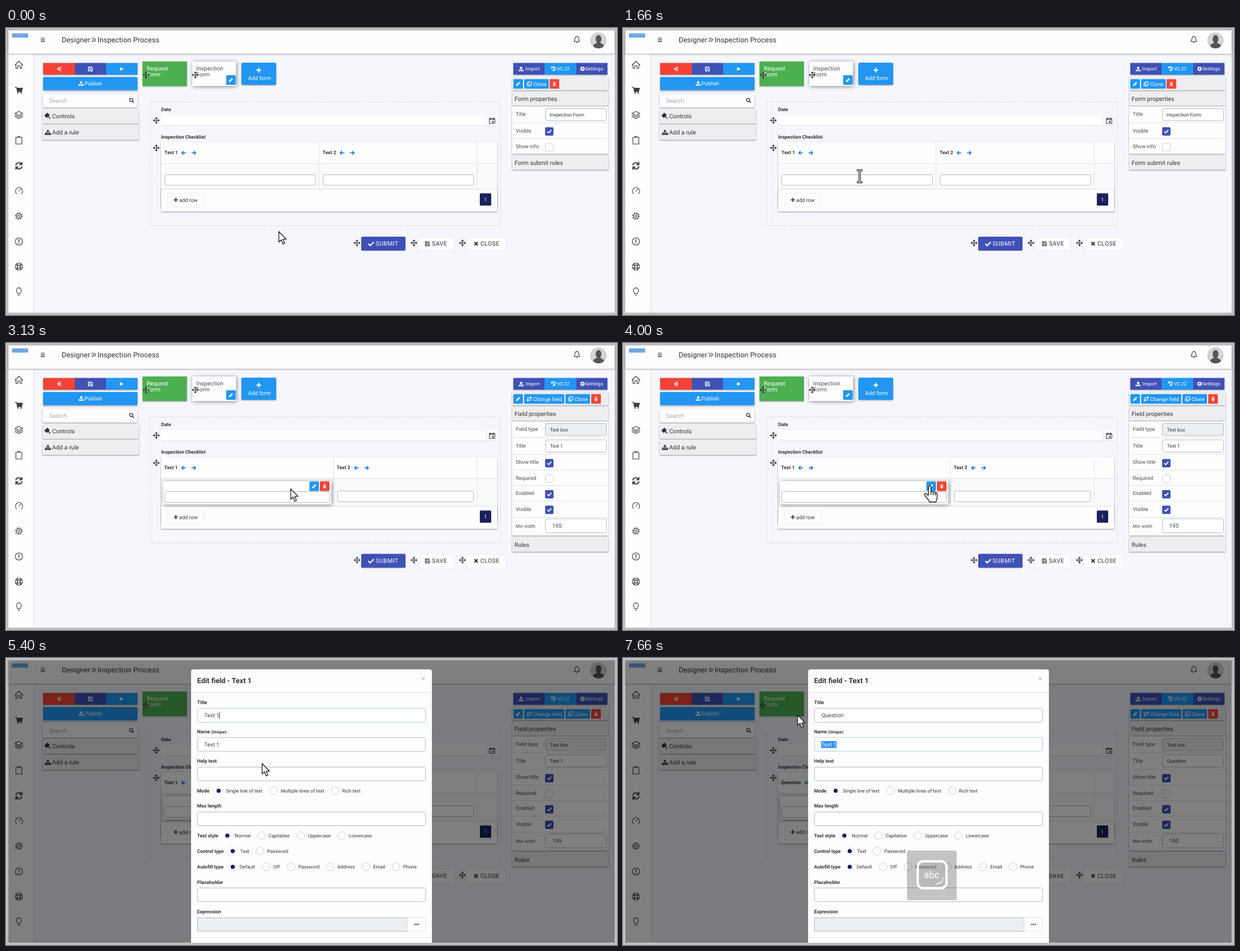
Recreate the animation shown at these times as an HTML page. Size 1020 by 480 pixels, loop 8 s.

```html
<!DOCTYPE html>
<html lang="en">
<head>
<meta charset="utf-8">
<title>Form designer</title>
<style>
html, body { margin: 0; width: 100%; height: 100%; overflow: hidden; background: #bfbfbf; }
svg { display: block; width: 1020px; height: 480px; }
text { font: 8px Roboto, "Open Sans", sans-serif; fill: #333; text-rendering: geometricPrecision; white-space: pre; }
.t { font-size: 12.1px; }
.h { font-size: 10px; }
.l { font-size: 8.7px; fill: #484c50; }
.v { font-size: 9.35px; fill: #444; }
.b { font-size: 8.1px; font-weight: 700; }
.c { font-size: 10px; letter-spacing: .35px; }
.w, .w text { fill: #fff; }
.blue { fill: #2196f3; } .indigo { fill: #3f51b5; } .red { fill: #f44336; } .white { fill: #fefefe; } .bar { fill: #eceeef; }
.line { fill: none; stroke: #e1e4e9; }
.in { fill: #fff; stroke: #b9bdc1; }
.s { fill: none; stroke: #3c4043; stroke-width: 1.1; stroke-linejoin: round; stroke-linecap: round; }
.sw { fill: none; stroke: #fff; stroke-width: 1.2; }
.card { filter: drop-shadow(0 1px 1.2px #0006); }
.lift { filter: drop-shadow(1px 1px 3px #0007); }
.dash { fill: none; stroke: #d3d8df; stroke-dasharray: 2 1.6; }

/* One 8 s timeline for everything */
.before, .after, .edit, .old, .typed, .named, .keys, .sel, .caret, .focus, .focus2, .foot, .pos, .arrow, .beam, .hand {
  animation: 8s step-end infinite;
}
.before { animation-name: before; } .after { animation-name: after; }
.edit { animation-name: edit; } .old { animation-name: old; }
.typed { animation-name: typed; } .named { animation-name: named; }
.keys { animation-name: keys; } .sel { animation-name: sel; }
.caret { animation-name: caret; } .focus { animation-name: focus; } .focus2 { animation-name: focus2; }
.foot { animation-name: foot; } .pos { animation-name: pos; }
.arrow { animation-name: arrow; } .beam { animation-name: beam; } .hand { animation-name: hand; }

@keyframes before { 0% { opacity: 1 } 27.49%, 100% { opacity: 0 } }
@keyframes after { 0% { opacity: 0 } 27.49%, 100% { opacity: 1 } }
@keyframes edit { 0% { opacity: 0 } 54.11%, 100% { opacity: 1 } }
@keyframes old { 0% { opacity: 1 } 91.61%, 100% { opacity: 0 } }
@keyframes typed { 0% { opacity: 0 } 91.61%, 100% { opacity: 1 } }
@keyframes named { 0% { opacity: 0 } 94.99%, 100% { opacity: 1 } }
@keyframes keys { 0% { opacity: 0 } 89.11%, 100% { opacity: 1 } }
@keyframes foot { 0% { transform: none } 27.49%, 100% { transform: translateY(3.6px) } }
@keyframes sel {
  0% { clip-path: inset(0 0 0 100%) }
  81.79% { clip-path: inset(0 0 0 100%); animation-timing-function: steps(3) }
  84%, 100% { clip-path: inset(0) }
}
@keyframes caret {
  0%, 60.75%, 74%, 81.8%, 100% { opacity: 0 }
  54.11%, 67.37%, 80.62% { opacity: 1 }
}
@keyframes focus { 0%, 94.99%, 100% { stroke: #b9bdc1 } 57.49% { stroke: #b4cfdd } }
@keyframes focus2 { 0% { stroke: #b9bdc1 } 94.99%, 100% { stroke: #b4cfdd } }
@keyframes pos {
  0% { transform: translate(455px, 340px) }
  .74% { transform: translate(451px, 340px) }
  2.49% { transform: translate(451px, 341px) }
  8.27% { transform: translate(451px, 341px); animation-timing-function: steps(13) }
  19.11% { transform: translate(395px, 259px) }
  19.24% { transform: translate(395px, 259px); animation-timing-function: steps(2) }
  20.74% { transform: translate(395px, 248px); animation-timing-function: steps(4) }
  24.11% { transform: translate(396px, 234px) }
  29.9% { transform: translate(396px, 234px); animation-timing-function: steps(13) }
  40.74% { transform: translate(489px, 245px); animation-timing-function: steps(6) }
  45.8% { transform: translate(513px, 228px); animation-timing-function: steps(5) }
  49.99% { transform: translate(512px, 239px) }
  56.65% { transform: translate(512px, 239px); animation-timing-function: steps(13) }
  67.4% { transform: translate(427px, 176px); animation-timing-function: steps(13) }
  78.24% { transform: translate(384px, 100px); animation-timing-function: steps(3) }
  80.74% { transform: translate(369px, 99px); animation-timing-function: steps(8) }
  87.5%, 100% { transform: translate(291px, 95px) }
}
@keyframes arrow {
  0%, 21.57%, 57.48%, 66.4%, 73.5%, 85.1%, 100% { opacity: 1 }
  18.6%, 46.6%, 62.5%, 70.2%, 77.2% { opacity: 0 }
}
@keyframes beam {
  0%, 21.57%, 66.4%, 73.5%, 85.1%, 100% { opacity: 0 }
  18.6%, 62.5%, 70.2%, 77.2% { opacity: 1 }
}
@keyframes hand { 0%, 57.48%, 100% { opacity: 0 } 46.6% { opacity: 1 } }
</style>
</head>
<body>
<svg viewBox="0 0 1020 480">
<defs>
  <path id="move" d="M-4.5 0H4.5M0-4.5V4.5M-3-1.7L-4.8 0L-3 1.7M3-1.7L4.8 0L3 1.7M-1.7-3L0-4.8L1.7-3M-1.7 3L0 4.8L1.7 3" fill="none" stroke="#3a3a3a" stroke-width="1.2"/>
  <path id="pen" d="M-3.6 3.6L-3 1.2L1.5-3.3L3.4-1.4L-1.1 3.1Z" fill="#fff"/>
  <path id="bin" d="M-2.4-1.7H2.4L2.1 3.7H-2.1ZM-3-3.2H-1.1L-.7-3.9H.7L1.1-3.2H3V-2.4H-3ZM-.9-.8V2.8M.9-.8V2.8" fill="#fff" stroke="#f44336" stroke-width=".4"/>
  <path id="left" d="M3.6 0H-3M0-3L-3 0L0 3" fill="none" stroke="#1976d2" stroke-width="1.5"/>
  <path id="right" d="M-3.6 0H3M0-3L3 0L0 3" fill="none" stroke="#1976d2" stroke-width="1.5"/>
  <path id="disk" d="M-3.5-3.5H2.1L3.5-2.1V3.5H-3.5ZM-2-3.4V-1.2H1.5V-3.4M-2 3.4V.9H2V3.4" fill="none" stroke-width="1"/>
  <path id="up" d="M0-4L3-1H1.1V1.6H-1.1V-1H-3ZM-4.2 1.4H-1.8V2.4H1.8V1.4H4.2V4H-4.2Z" fill="#fff"/>
  <path id="copy" d="M-1.6-3.6H3.7V1.7H-1.6ZM-1.6-1.6H-3.6V3.6H1.6V1.7" class="sw" style="stroke-width:1"/>
  <g id="yes"><rect x="-7" y="-7" width="14" height="14" rx="2" class="indigo"/><path d="M-3.3 0L-1 2.4L3.4-2.3" class="sw" style="stroke-width:1.7"/></g>
  <rect id="no" x="-6.5" y="-6.5" width="13" height="13" rx="2" fill="#fff" stroke="#cfd2d6"/>
  <circle id="ring" r="6.5" fill="#fff" stroke="#cdd0d4"/>
  <g id="dot"><circle r="6.5" fill="#fff" stroke="#eef0f3"/><circle r="3.5" fill="#1a2060"/></g>
  <g id="bluepen"><rect x="-8" y="-8" width="16" height="16" rx="1.5" class="blue"/><use href="#pen"/></g>
  <g id="redbin"><rect x="-8" y="-8" width="16" height="16" rx="1.5" class="red"/><use href="#bin"/></g>
  <g id="clone"><rect width="41" height="16" rx="1.5" class="blue"/><use href="#copy" x="8.5" y="8"/><text x="15" y="11.1" class="l w">Clone</text></g>
</defs>

<rect width="1020" height="480" fill="#bfbfbf"/>
<rect x="4" y="4" width="1012" height="472" fill="#f5f7fc"/>

<!-- Side bar -->
<path d="M4 43H46V476H4Z" class="white"/><path d="M46.5 43V476" stroke="#dcdfe4"/>
<g class="s">
  <path d="M15 62L21.5 55.5L28 62M16.7 61V67.5H19.7V63H23.3V67.5H26.3V61"/>
  <path d="M15 99H17.5L19 106.5H26L27.5 100.5H18" fill="#3c4043"/><circle cx="20" cy="108.5" r=".8"/><circle cx="25.5" cy="108.5" r=".8"/>
  <path d="M21.5 139.5L28 142.7L21.5 146L15 142.7ZM15 145.5L21.5 148.7L28 145.5M15 148.2L21.5 151.5L28 148.2"/>
  <path d="M16.5 183H26.5V194H16.5ZM19.5 183V181.5H23.5V183"/>
  <path d="M16.5 229C17.5 224.5 24 224 26.2 228M26.5 232C25.5 236.5 19 237 16.8 233M26.5 225V228.5H23M16.5 236V232.5H20" stroke-width="1.8"/>
  <path d="M17.5 277A6 6 0 1 1 26 277M21.5 273L24.5 269.5"/>
  <g stroke-linecap="butt"><circle cx="21.5" cy="314.5" r="1.8"/><circle cx="21.5" cy="314.5" r="4.3"/><circle cx="21.5" cy="314.5" r="5.5" stroke-dasharray="1.7 2.62" stroke-width="1.6"/></g>
  <circle cx="21.5" cy="357" r="6"/><path d="M21.5 353.7V358M21.5 360V360.3" stroke-width="1.4"/>
  <circle cx="21.5" cy="399" r="6"/><circle cx="21.5" cy="399" r="2.5"/><path d="M16.6 396L19.4 397.7M18.5 394.1L20.2 396.9M26.4 396L23.6 397.7M24.5 394.1L22.8 396.9M16.6 402L19.4 400.3M18.5 403.9L20.2 401.1M26.4 402L23.6 400.3M24.5 403.9L22.8 401.1"/>
  <path d="M19.5 444.5C19.5 442 17.3 441.5 17.3 438.8A4.2 4.2 0 0 1 25.7 438.8C25.7 441.5 23.5 442 23.5 444.5ZM20 447H23"/>
</g>

<!-- Top bar -->
<path d="M4 4H1016V43H4Z" class="white" style="filter:drop-shadow(0 1px 1.5px #0005)"/>
<rect x="10" y="9" width="27" height="7" fill="#6fa8e2"/>
<path d="M58 17H65M58 19.8H65M58 22.6H65" stroke="#333" stroke-width="1.2"/>
<text x="93" y="24" class="t">Designer</text><text x="153" y="24" class="t">Inspection Process</text>
<path d="M143.5 16.5L146.3 19.7L143.5 22.9M147 16.5L149.8 19.7L147 22.9" class="s"/>
<path d="M948.5 22.5C950 21 949.3 17 950.7 15.3C952 13.7 954 13.7 955.3 15.3C956.7 17 956 21 957.5 22.5ZM951.8 24.5H954.2" class="s"/>
<circle cx="989" cy="21" r="13" fill="#d5d5d5" stroke="#bdbdbd"/>
<path d="M980.5 30.5C980.5 26 985 26.5 986.5 24.5H992C993.5 26.5 998 26 998 30.5A12.5 12.5 0 0 1 980.5 30.5Z" fill="#555"/><ellipse cx="989.2" cy="18.5" rx="4.8" ry="6.8" fill="#555"/>

<!-- Left panel -->
<path d="M61 106.5H222" stroke="#d4d8dd"/>
<g class="card"><path d="M62 58.5H115V78H62Z" class="red"/><path d="M115 58.5H167V78H115Z" class="indigo"/><path d="M167 58.5H219.5V78H167Z" class="blue"/><rect x="62" y="82" width="157.5" height="22" rx="1.5" class="blue"/></g>
<path d="M92 65.5H90V67.5M92 71.5H90V69.5M92.5 68.5H86M88.5 66L86 68.5L88.5 71" class="sw"/>
<use href="#disk" x="141" y="68.5" stroke="#fff"/><path d="M190.5 65.3L196.5 68.5L190.5 71.7Z" fill="#fff"/>
<use href="#up" x="125.5" y="92.5"/><text x="131" y="96" class="w" style="font-size:9px">Publish</text>
<g class="card"><rect x="61" y="111" width="158.5" height="22" rx="1.5" class="white"/><path d="M61 137H222V160H61ZM61 164H222V187H61Z" class="bar"/></g>
<text x="72" y="125.3" style="font-size:9.6px;fill:#a4a9b5">Search</text>
<circle cx="209" cy="120.3" r="2.7" class="s" style="stroke-width:1.4"/><path d="M211 122.5L213.5 125" stroke="#333" stroke-width="1.5"/>
<path d="M65 146.5L69 142.5L72 145.5L68 149.5ZM70 147L74 151.5" fill="#333" stroke="#333" stroke-width="1.5"/>
<path d="M68.5 170.5H71.5V173.5H68.5ZM65 176H68V179H65ZM68.5 176H71.5V179H68.5ZM72 176H75V179H72Z" fill="#333"/><path d="M70 173V176M66.5 176V174.7H73.5V176" class="s"/>
<text x="77" y="151.4" class="h">Controls</text><text x="77" y="178.4" class="h">Add a rule</text>

<!-- Form tabs -->
<path d="M228 56H302V97H228Z" fill="#4caf50" class="card"/>
<g class="w"><text x="235" y="71" style="font-size:9.8px">Request</text><text x="235" y="81" style="font-size:9.8px">Form</text></g>
<use href="#move" x="234" y="78.5"/>
<path d="M311 56H384V97H311Z" class="white lift"/>
<text x="317.5" y="71" style="font-size:9.7px;fill:#555">Inspection</text><text x="317.5" y="81" style="font-size:9.7px;fill:#555">Form</text>
<use href="#move" x="316" y="78.5"/><use href="#bluepen" x="375.5" y="87"/>
<rect x="393" y="58" width="58" height="37" rx="2.5" class="blue card"/><path d="M418 70.5H426M422 66.5V74.5" class="sw" style="stroke-width:1.8"/>
<text x="404" y="87" class="w" style="font-size:9.2px">Add form</text>

<!-- Form body -->
<text x="259" y="138.5" class="b">Date</text>
<path d="M259 146H820V163H259Z" class="white"/><path d="M259 163.5H820M802.5 146V163" class="line"/>
<path d="M807 151.5H816V159.5H807ZM807 153H816M809 149.8V152M814 149.8V152" class="s"/><path d="M811.5 155.5H814V158H811.5Z" fill="#333"/>
<use href="#move" x="251" y="154.5"/><use href="#move" x="251" y="200.5"/>
<text x="259" y="185" class="b">Inspection Checklist</text>
<path d="M259 191H820V300H259Z" class="white card"/><path d="M259 227H820V280H259Z" fill="#f9fafc"/>
<path d="M259 226.5H820M786.5 191V270" class="line"/>
<g class="before">
  <rect x="240.5" y="123.5" width="585" height="207" class="dash"/>
  <path d="M522.5 191V270" class="line"/>
  <text x="264.5" y="211.3" class="b">Text 1</text><use href="#left" x="296.5" y="208.8"/><use href="#right" x="313.5" y="208.8"/>
  <text x="528.5" y="211.3" class="b">Text 2</text><use href="#left" x="561" y="208.8"/><use href="#right" x="578" y="208.8"/>
  <rect x="265" y="245.5" width="251.5" height="17.5" rx="2.5" class="in"/><rect x="529.5" y="245.5" width="251" height="17.5" rx="2.5" class="in"/>
</g>
<g class="after">
  <rect x="240.5" y="123.5" width="585" height="211" class="dash"/>
  <path d="M546.5 191V274M786.5 270V274" class="line"/>
  <g class="old"><text x="264" y="211.3" class="b">Text 1</text><use href="#left" x="296.5" y="208.8"/><use href="#right" x="313.5" y="208.8"/></g>
  <g class="typed"><text x="264" y="211.3" class="b">Question</text><use href="#left" x="307" y="208.8"/></g>
  <text x="552" y="211.3" class="b">Text 2</text><use href="#left" x="585" y="208.8"/><use href="#right" x="602" y="208.8"/>
  <rect x="553.5" y="247.5" width="227" height="18" rx="2.5" class="in"/>
</g>
<g class="foot">
  <path d="M259 269.5H820V307H259Z" class="white card"/><path d="M259 269.5H820" class="line"/>
  <rect x="269.5" y="276.5" width="62" height="23" rx="1.5" fill="#fff" stroke="#eceef2"/>
  <path d="M280 287.5H287M283.5 284V291" stroke="#333" stroke-width="1.7"/><text x="289" y="290.6" style="font-size:8.7px">add row</text>
  <rect x="791" y="276.5" width="19" height="20.5" rx="1.5" fill="#1c205c"/><text x="798" y="290" class="w" style="font-size:8.5px">1</text>
  <use href="#move" x="586" y="359.5"/><use href="#move" x="681" y="359.5"/><use href="#move" x="762" y="359.5"/>
  <rect x="593" y="349" width="74" height="23.5" rx="2" class="indigo"/>
  <g fill="#fff" stroke="#eaecf1"><rect x="688.5" y="349.5" width="59" height="23" rx="2"/><rect x="769.5" y="349.5" width="65" height="23" rx="2"/></g>
  <path d="M605 361L608 364L614 358" class="sw" style="stroke-width:2.2"/><text x="617" y="364.3" class="c w">SUBMIT</text>
  <use href="#disk" x="703.5" y="360.8" stroke="#333"/><text x="711" y="364.3" class="c">SAVE</text>
  <path d="M782 358L787.5 363.5M787.5 358L782 363.5" stroke="#333" stroke-width="2"/><text x="792" y="364.3" class="c">CLOSE</text>
</g>
<g class="after">
  <path d="M262 231H543V270H262Z" class="white lift"/>
  <rect x="265" y="248.5" width="275.5" height="18" rx="2.5" class="in"/>
  <use href="#bluepen" x="514.5" y="239.5"/><use href="#redbin" x="532" y="239.5"/>
</g>

<!-- Right panel -->
<g class="card"><path d="M847 58.5H899V78H847ZM952 58.5H1004V78H952Z" class="indigo"/><path d="M899 58.5H952V78H899Z" class="blue"/></g>
<use href="#up" x="860" y="68.3"/><text x="867" y="71.3" class="w">Import</text>
<path d="M911.5 66A3.2 3.2 0 1 1 912 70.5M910.5 64.5V67H913M914.3 66.5V68.7L915.7 69.5" class="sw"/><text x="920" y="71.3" class="w">V0.22</text>
<circle cx="962.5" cy="68.3" r="2.3" class="sw" style="stroke-width:1.7"/><circle cx="962.5" cy="68.3" r="3.3" class="sw" stroke-dasharray="1.4 1.19"/><text x="967" y="71.3" class="w" style="font-size:8.2px">Settings</text>
<path d="M845 82H1006V104H845ZM845 107H1006V130H845Z" class="bar card"/>
<use href="#bluepen" x="855" y="93.5"/>
<g class="before">
  <use href="#clone" x="865" y="85.5"/><use href="#redbin" x="915.5" y="93.5"/>
  <text x="849" y="122" class="h">Form properties</text>
  <path d="M845 131H1006V210.5H845Z" class="white card"/><path d="M845 158.5H1006M845 184.5H1006" class="line"/>
  <text x="851" y="147.3" class="l">Title</text><rect x="900.5" y="134.5" width="102" height="20.5" rx="3" class="in"/><text x="907.5" y="147.6">Inspection Form</text>
  <text x="851" y="174.5" class="l">Visible</text><use href="#yes" x="907" y="173"/>
  <text x="851" y="200.5" class="l">Show info</text><use href="#no" x="907" y="199.5"/>
  <path d="M845 214H1006V237H845Z" class="bar card"/><text x="849" y="229" class="h">Form submit rules</text>
</g>
<g class="after">
  <rect x="865" y="85.5" width="67" height="16" rx="1.5" class="blue"/><path d="M869.5 91.5H877M875 89.3L877.2 91.5L875 93.7M877.5 95.5H870M872 93.3L869.8 95.5L872 97.7" class="sw"/><text x="880" y="96.6" class="l w">Change field</text>
  <use href="#clone" x="934" y="85.5"/><use href="#redbin" x="985" y="93.5"/>
  <text x="849" y="122" class="h">Field properties</text>
  <path d="M845 131H1006V322H845Z" class="white card"/><path d="M845 158.5H1006M845 186.5H1006M845 212.5H1006M845 238.5H1006M845 264.5H1006M845 291.5H1006" class="line"/>
  <text x="851" y="147.3" class="l">Field type</text><rect x="900.5" y="134.5" width="102" height="20.5" rx="3" class="in" style="fill:#eceff1"/><text x="908" y="147.6">Text box</text>
  <text x="851" y="174.5" class="l">Title</text><rect x="900.5" y="162" width="102" height="20.5" rx="3" class="in"/><text x="908" y="175" class="old">Text 1</text><text x="908" y="175" class="typed">Question</text>
  <text x="851" y="202" class="l">Show title</text><use href="#yes" x="907" y="201"/>
  <text x="851" y="228.5" class="l">Required</text><use href="#no" x="907" y="227"/>
  <text x="851" y="254.3" class="l">Enabled</text><use href="#yes" x="907" y="253"/>
  <text x="851" y="280.5" class="l">Visible</text><use href="#yes" x="907" y="279"/>
  <text x="851" y="309" class="l" style="font-size:7.5px">Min width</text><rect x="900.5" y="294" width="102" height="23.5" rx="3" class="in"/><text x="912" y="309.3" class="v">195</text>
  <path d="M845 325.5H1006V349H845Z" class="bar card"/><text x="849" y="340.7" class="h">Rules</text>
</g>

<!-- Edit dialog -->
<g class="edit">
  <path d="M4 4H1016V476H4Z" opacity=".5"/>
  <path d="M309 476V23Q309 19 313 19H707Q711 19 711 23V476Z" class="white"/>
  <path d="M309 57.5H711M309 467.5H711" class="line"/>
  <text x="319" y="41.8" style="font-size:12px;font-weight:700">Edit field - Text 1</text>
  <path d="M694 32L699 37M699 32L694 37" stroke="#9a9da1"/>
  <g class="in">
    <rect x="319.5" y="84" width="381" height="23.5" rx="3" class="focus"/><rect x="319.5" y="133" width="381" height="23" rx="3" class="focus2"/>
    <rect x="319.5" y="182.5" width="381" height="23" rx="3"/><rect x="319.5" y="257.5" width="381" height="23" rx="3"/><rect x="319.5" y="384.5" width="381" height="23" rx="3"/>
    <path d="M319.5 434.5H670V457H319.5Z" fill="#eceff1"/>
  </g>
  <path d="M670 434.5H700.5V457H670" fill="#fff" stroke="#e3e6ea"/><path d="M681.5 445.5H689.5" stroke="#333" stroke-width="2" stroke-dasharray="2 1"/>
  <text x="319" y="77" class="b">Title</text>
  <text x="319" y="126" class="b">Name</text><text x="342" y="126" class="b" style="font-size:6.8px">(Unique)</text>
  <text x="319" y="175" class="b">Help text</text>
  <text x="319" y="224.7" class="b">Mode</text>
  <text x="319" y="250" class="b">Max length</text>
  <text x="319" y="299.7" class="b">Text style</text>
  <text x="319" y="325.8" class="b">Control type</text>
  <text x="319" y="351.8" class="b">Autofill type</text>
  <text x="319" y="377.5" class="b">Placeholder</text>
  <text x="319" y="427" class="b">Expression</text>
  <use href="#dot" x="355" y="222"/><use href="#ring" x="447" y="222"/><use href="#ring" x="549.5" y="222"/>
  <use href="#dot" x="369.5" y="297"/><use href="#ring" x="426.5" y="297"/><use href="#ring" x="492" y="297"/><use href="#ring" x="560" y="297"/>
  <use href="#dot" x="378.5" y="323"/><use href="#ring" x="424" y="323"/>
  <use href="#dot" x="378.5" y="349.3"/><use href="#ring" x="434.5" y="349.3"/><use href="#ring" x="476" y="349.3"/><use href="#ring" x="541.5" y="349.3"/><use href="#ring" x="601" y="349.3"/><use href="#ring" x="651" y="349.3"/>
  <text x="367" y="224.5">Single line of text</text><text x="459" y="224.5">Multiple lines of text</text><text x="561" y="224.5">Rich text</text>
  <text x="382" y="299.5">Normal</text><text x="438" y="299.5">Capitalise</text><text x="504" y="299.5">Uppercase</text><text x="572" y="299.5">Lowercase</text>
  <text x="391" y="325.5">Text</text><text x="436" y="325.5">Password</text>
  <text x="390" y="351.8">Default</text><text x="446" y="351.8">Off</text><text x="488" y="351.8">Password</text><text x="553" y="351.8">Address</text><text x="613" y="351.8">Email</text><text x="663" y="351.8">Phone</text>
  <g class="old">
    <text x="331" y="99" class="v">Text 1</text><path d="M356.5 90V101.5" stroke="#444" class="caret"/>
    <g class="sel"><path d="M331 90H356.5V101.5H331Z" fill="#2f8ff5"/><text x="331" y="99" class="v w">Text 1</text></g>
  </g>
  <text x="331" y="99" class="v typed">Question</text>
  <text x="331" y="148" class="v">Text 1</text>
  <g class="named"><path d="M331 139H356.5V150.5H331Z" fill="#2f8ff5"/><text x="331" y="148" class="v w">Text 1</text></g>
</g>

<!-- Key indicator -->
<g class="keys">
  <rect x="474" y="322" width="83" height="83" rx="3" opacity=".23"/>
  <rect x="492" y="340" width="48" height="45" rx="9" fill="#aaa" fill-opacity=".35" stroke="#fff" stroke-width="4"/>
  <path d="M522 377.5C530 378 534 374 534 367" class="sw"/>
  <text x="502" y="368" class="w typed" style="font-size:16px">abc</text>
</g>

<!-- Pointer -->
<g class="pos" stroke-linejoin="round">
  <path class="arrow" d="M.5 .5V18L4.5 14.3L7.3 21.3L10.2 20L7.3 13.3H12.8Z" fill="#fff" stroke="#222" stroke-width="1.3"/>
  <g class="beam" fill="none">
    <path d="M-4.5-10H-2Q0-10 0-8V8Q0 10-2 10H-4.5M4.5-10H2Q0-10 0-8M4.5 10H2Q0 10 0 8" stroke="#222" stroke-width="3.4"/>
    <path d="M-4-10H-2Q0-10 0-8V8Q0 10-2 10H-4M4-10H2Q0-10 0-8M4 10H2Q0 10 0 8" stroke="#fff" stroke-width="1.2"/>
  </g>
  <path class="hand" transform="translate(-9 -1)" d="M7 16V3.2A2.1 2.1 0 0 1 11.2 3.2V12C11.2 9.4 15 9.4 15 12V12.8C15 10.4 18.5 10.6 18.5 13V14C18.5 12 21.5 12 21.5 14.4V20C21.5 23 20 24 19.5 28H8.5C8 25 5.5 23 4 21L.8 16.5C-.6 14.1 2.2 12.5 3.8 14.3L7 17.500M11.2 12V16M15 12.8V16.5M18.5 14V17" fill="#fff" stroke="#222" stroke-width="1.4"/>
</g>
</svg>
</body>
</html>
```
